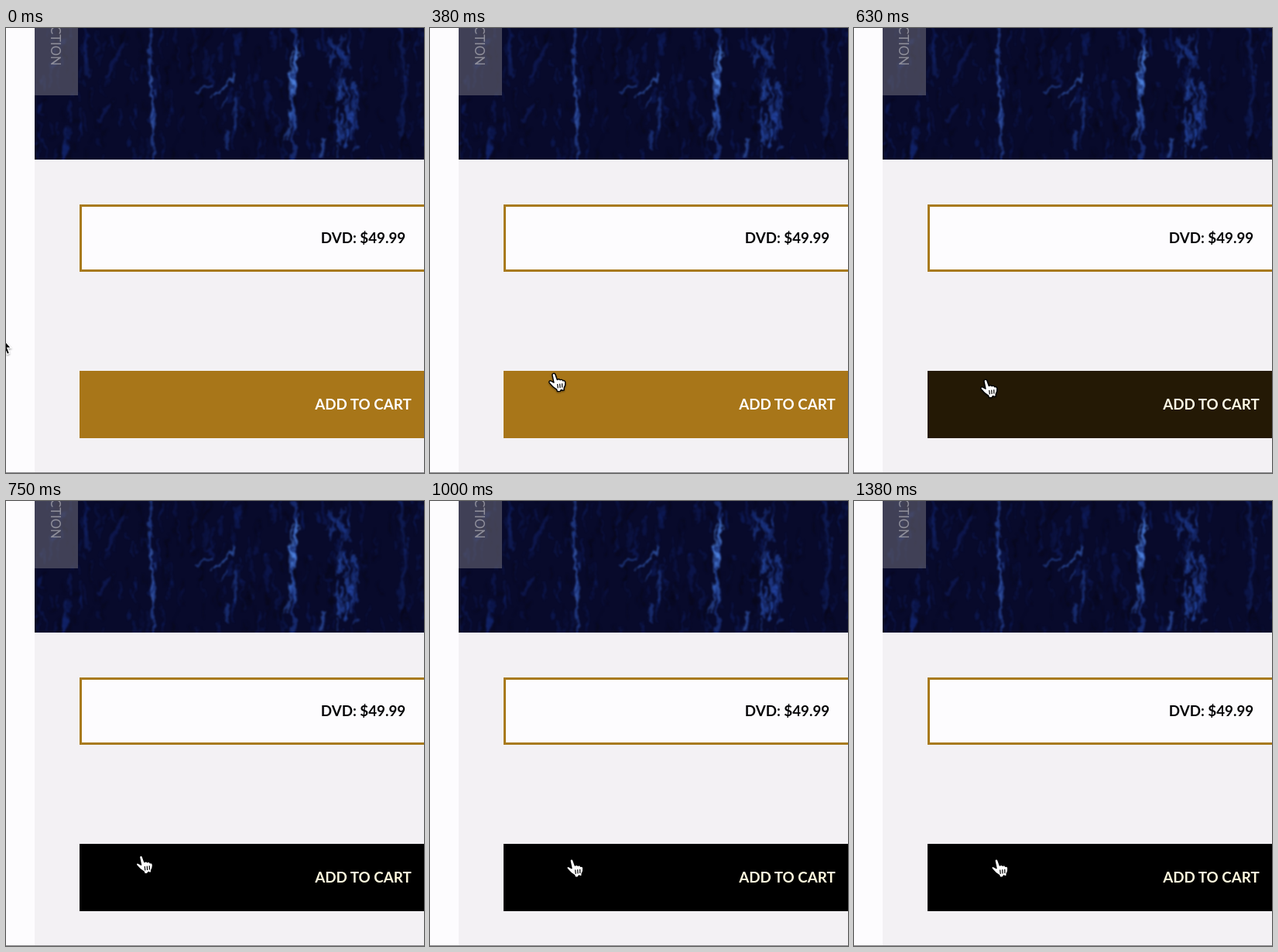
These frames come from a looping animation (540x575 px, 1510 ms). An HTML page:

```html
<!DOCTYPE html>
<html lang="en">
<head>
<meta charset="utf-8">
<title>Add to cart</title>
<style>
  html, body { margin: 0; width: 100%; height: 100%; overflow: hidden; background: #fdfcfe; }
  svg { display: block; width: 540px; height: 575px; }
  text { font-family: Lato, "Open Sans", sans-serif; }
  .label { font-size: 18.75px; font-weight: 700; text-anchor: middle; }
</style>
</head>
<body>
<svg viewBox="0 0 540 575">
  <defs>
    <clipPath id="photo"><rect x="37" width="503" height="170"/></clipPath>
    <filter id="rough" x="20" y="-20" width="540" height="210" filterUnits="userSpaceOnUse" color-interpolation-filters="sRGB">
      <feTurbulence type="fractalNoise" baseFrequency=".11 .06" numOctaves="3" seed="4" result="noise"/>
      <feDisplacementMap in="SourceGraphic" in2="noise" scale="14" xChannelSelector="R" yChannelSelector="G"/>
      <feGaussianBlur stdDeviation="1"/>
    </filter>
    <filter id="shade" x="-50%" y="-50%" width="200%" height="200%">
      <feDropShadow dx="0" dy="1.2" stdDeviation="1" flood-opacity=".4"/>
    </filter>
  </defs>

  <rect width="540" height="575" fill="#fdfcfe"/>
  <rect x="37" y="170" width="503" height="404" fill="#f3f1f4"/>

  <g clip-path="url(#photo)">
    <rect x="37" width="503" height="170" fill="#080a2b"/>
    <g id="bark" fill="none" filter="url(#rough)"></g>
    <rect x="37" width="56" height="87" fill="#83808a" fill-opacity=".46"/>
    <text transform="translate(58 48.5) rotate(90)" font-size="16.5" text-anchor="end" fill="#8e8e9a">CTION</text>
  </g>

  <rect x="96.5" y="229.5" width="460" height="84" fill="#fdfcfe" stroke="#a87a1c" stroke-width="3"/>
  <text class="label" x="461.5" y="278" fill="#050507">DVD: $49.99</text>

  <rect id="button" x="95" y="443" width="445" height="87"/>
  <text id="cart" class="label" x="461.5" y="493">ADD TO CART</text>
  <rect y="574" width="540" height="1" fill="#8a898c"/>

  <g id="arrow" filter="url(#shade)">
    <path d="M0 0V18L4 14.3L7 21.5L10 20.2L7.2 13.4H12Z" fill="#000" stroke="#fff" stroke-width="1.2"/>
  </g>
  <g id="hand" filter="url(#shade)">
    <path d="M-.5 1.6C-.9 -.9 2.6 -1.6 3.4 .8L5.8 7.6C6.8 6.4 9 6.5 9.6 7.8C10.8 6.9 12.6 7.4 13.1 8.8C14.4 8 16 9 16.3 10.6C16.7 13 16 16 14.6 18.4L14.8 20.8L12.4 21.4L11 20.4L9.6 22.4L6 22.6L5.2 20.2C2.4 18.6 -1.4 15.2 -4.2 11.6C-5.6 9.5 -3.5 8 -1.6 9.3L1.5 11.2Z"
      fill="#fff" stroke="#000" stroke-width="1.4" stroke-linejoin="round"/>
    <path d="M6.2 13L6.8 18.4M9.2 12.6L9.6 18M12.2 12.2L12.4 17.6" fill="none" stroke="#000" stroke-width="1.2"/>
  </g>
</svg>
<script>
  const el = id => document.getElementById(id);
  const LOOP = 1510;

  let seed = 41;
  const rand = () => (seed = (seed * 16807) % 2147483647) / 2147483647;

  function streak(d, color, width, opacity) {
    const p = document.createElementNS("http://www.w3.org/2000/svg", "path");
    p.setAttribute("d", d);
    p.setAttribute("stroke", color);
    p.setAttribute("stroke-width", width);
    p.setAttribute("stroke-opacity", opacity);
    el("bark").append(p);
  }

  // Short upright strokes scattered over a box
  function scatter(x, y, w, h, count, color, opacity) {
    for (let i = 0; i < count; i++) {
      const len = 8 + rand() * 22, lean = (rand() - .5) * 8;
      const top = y + rand() * Math.max(h - len, 1);
      streak(`M${x + rand() * w} ${top}l${lean} ${len}`, color, 1 + rand() * 3, opacity * (.5 + rand() * .5));
    }
  }

  scatter(37, -20, 510, 215, 240, "#142e8c", .34);
  scatter(37, -20, 510, 215, 160, "#070615", .55);

  // Main folds
  [
    ["M187 0Q184 50 188 85T190 175", "#2c51ad", 4, .6],
    ["M188 62L189 135", "#4a74cf", 2, .5],
    ["M372 0L376 25L370 95L371 175", "#2448ac", 5, .5],
    ["M416 14Q434 30 443 52", "#234bb4", 7, .4],
    ["M266 88L288 74L293 58", "#3e6fd2", 3, .6],
    ["M243 84L265 75M275 104L288 88", "#315bc0", 2.5, .55],
    ["M296 92L297 132M286 132L283 157", "#2a55bd", 4, .45],
    ["M412 142L406 168", "#3f70da", 5, .5],
    ["M78 130L75 172M102 20L107 65", "#1b3892", 5, .35],
    ["M153 20L127 62M134 97L120 120", "#17308a", 5, .35],
    ["M509 0L516 55L511 140", "#1c3a96", 4, .35]
  ].forEach(s => streak(...s));
  scatter(367, 18, 16, 78, 16, "#5288e6", .65);
  scatter(365, 85, 10, 85, 9, "#3a68ca", .5);
  scatter(428, 55, 26, 120, 40, "#2f5cca", .55);
  scatter(413, 8, 32, 52, 12, "#2a52bc", .45);

  // start time, pointer x, pointer y, button fade (0 gold, 1 black)
  const steps = [
    [0, -5.5, 400, 0],
    [130, 68, 423, 0],
    [250, 138, 439, 0],
    [380, 158.5, 447, 0],
    [500, 163.5, 451, .26],
    [630, 168.5, 455, .785],
    [750, 173, 459, 1],
    [880, 178, 462, 1],
    [1000, 181.5, 463.5, 1],
    [1250, 182, 463.5, 1],
    [1380, 182.5, 463.5, 1]
  ];
  const mix = (a, b, k) => `rgb(${a.map((v, i) => Math.round(v + (b[i] - v) * k))})`;

  function draw(now) {
    const t = now % LOOP;
    const [start, x, y, fade] = steps.filter(s => s[0] <= t).pop();
    const over = start >= 380;
    el("button").setAttribute("fill", mix([168, 118, 25], [0, 0, 0], fade));
    el("cart").setAttribute("fill", mix([255, 255, 255], [255, 249, 222], fade));
    el("arrow").setAttribute("visibility", over ? "hidden" : "visible");
    el("hand").setAttribute("visibility", over ? "visible" : "hidden");
    el(over ? "hand" : "arrow").setAttribute("transform", `translate(${x} ${y})`);
  }

  let origin;
  function tick(now) {
    origin ??= now;
    draw(now - origin);
    requestAnimationFrame(tick);
  }
  draw(0);
  requestAnimationFrame(tick);
</script>
</body>
</html>
```
